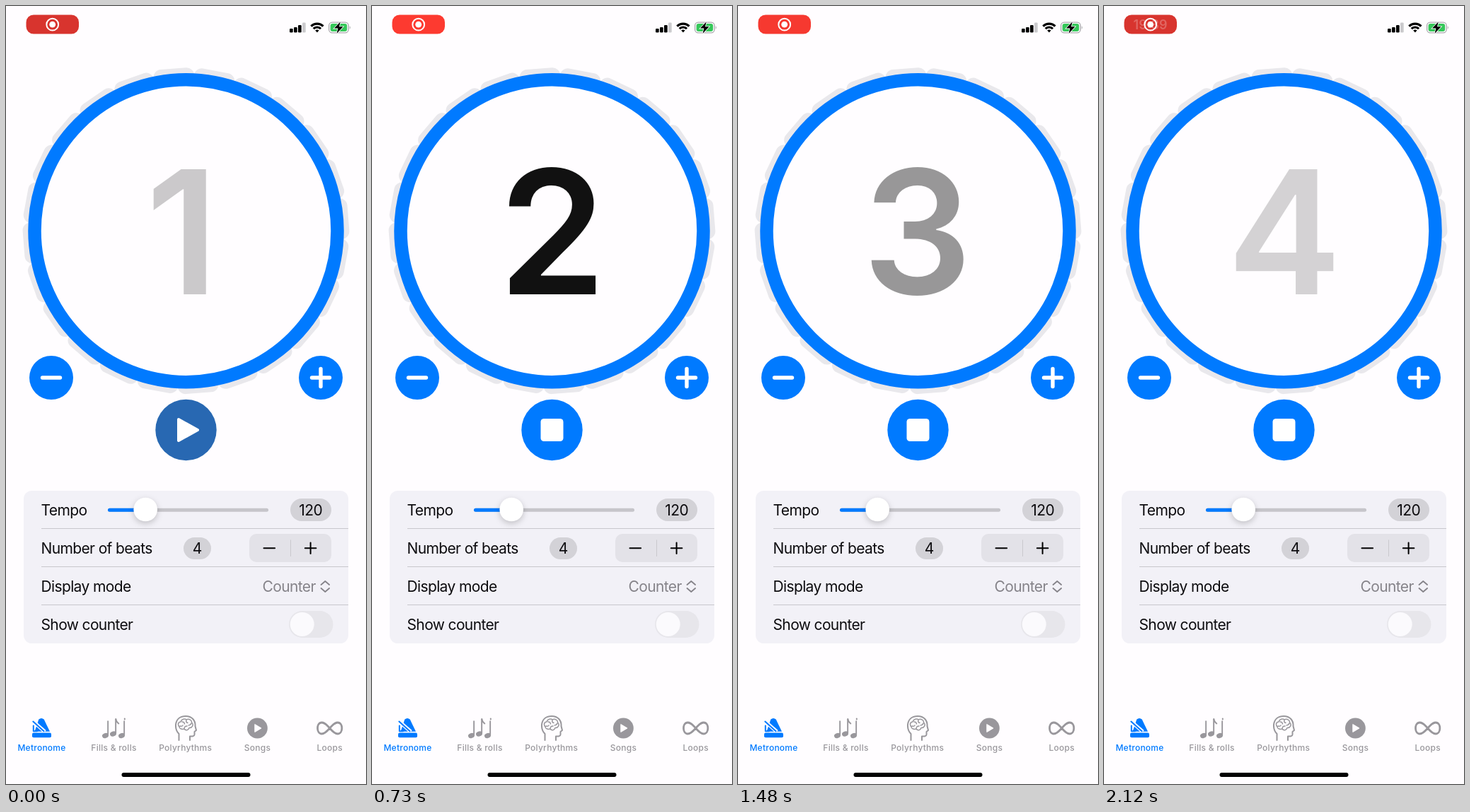
Recreate the animation shown at these times as an HTML page. Size 509 px wide and 1101 px high, loop 2150 ms.

```html
<!DOCTYPE html>
<html lang="en">
<head>
<meta charset="utf-8">
<title>Metronome</title>
<style>
html, body { margin: 0; width: 100%; height: 100%; overflow: hidden; background: #fffdff; }
svg { display: block; width: 100%; height: 100%; font-family: Inter, "Liberation Sans", sans-serif; }
.row { font-size: 21px; letter-spacing: -.03em; fill: #0c0b0e; }
.mid { text-anchor: middle; }
.tab { font-size: 12px; font-weight: 500; letter-spacing: .25px; text-anchor: middle; fill: #99979c; }
.line { fill: none; stroke-linecap: round; stroke-linejoin: round; }
.thumb { filter: drop-shadow(0 3px 4px rgba(0, 0, 0, .2)); }
</style>
</head>
<body>
<svg viewBox="0 0 509 1101">
  <rect width="509" height="1101" fill="#fffdff"/>

  <!-- status bar -->
  <rect id="pill" x="28.5" y="12.5" width="74.5" height="27" rx="10.5"/>
  <text id="clock" x="65.5" y="32.5" class="mid" font-size="18" font-weight="600" fill="#fff">19:39</text>
  <circle cx="65.7" cy="26.2" r="8.4" fill="none" stroke="#fff" stroke-width="2"/>
  <circle cx="65.7" cy="26.2" r="4.4" fill="#fff"/>
  <g id="signal"></g>
  <g class="line" stroke="#000" stroke-width="3.1" style="stroke-linecap:butt">
    <path d="M431.3 28.6a12.3 12.3 0 0 1 17.2 0M434.7 32.2a7.4 7.4 0 0 1 10.4 0"/>
    <path d="M437.2 34.4L439.9 37.4L442.6 34.4Q439.9 32.4 437.2 34.4Z" fill="#000" stroke="none"/>
  </g>
  <rect x="456.6" y="23.1" width="27.6" height="14.8" rx="4.6" fill="none" stroke="#a9a8ac" stroke-width="1.3"/>
  <rect x="458.6" y="25" width="23.6" height="11" rx="3" fill="#35c759"/>
  <path d="M485.8 28.2q2.2 2.2 0 4.8z" fill="#a9a8ac"/>
  <path d="M472.8 22.2L464 31.6H469.4L467.6 39L476.6 29.2H471Z" fill="#000" stroke="#fffdff" stroke-width="1.6" paint-order="stroke"/>

  <!-- dial -->
  <g id="lobes" fill="#e9e8ec"></g>
  <circle cx="254.5" cy="318.2" r="214" fill="#fffdff" stroke="#007aff" stroke-width="18.5"/>
  <text id="digit" y="407.5" font-size="243.5" font-weight="600"></text>

  <!-- buttons -->
  <g fill="#007aff">
    <circle cx="64" cy="526" r="31"/>
    <circle cx="445" cy="526" r="31"/>
    <circle id="button" cx="254.5" cy="600" r="43.2"/>
  </g>
  <path class="line" stroke="#fff" stroke-width="5.4" d="M51.5 526h25M432.5 526h25M445 513.5v25"/>
  <path id="play" d="M244 585L271 600L244 615Z" fill="#fff" stroke="#fff" stroke-width="4" stroke-linejoin="round"/>
  <rect id="stop" x="238.5" y="584" width="32" height="32" rx="4.5" fill="#fff"/>

  <!-- settings -->
  <rect x="25" y="686" width="459" height="216" rx="11.5" fill="#f2f1f7"/>
  <path d="M50 739.5H484M50 793.5H484M50 847.5H484" stroke="#c8c7cc"/>
  <text class="row" x="49.5" y="720.5">Tempo</text>
  <text class="row" x="49.5" y="774.5">Number of beats</text>
  <text class="row" x="49.5" y="828.5">Display mode</text>
  <text class="row" x="49.5" y="882.5">Show counter</text>
  <rect x="144" y="710.7" width="227" height="5" rx="2.5" fill="#c6c5ca"/>
  <rect x="144" y="710.7" width="53" height="5" rx="2.5" fill="#007aff"/>
  <circle class="thumb" cx="197.2" cy="712.5" r="16.8" fill="#fff"/>
  <rect x="402" y="697" width="58" height="32" rx="16" fill="#d3d2d7"/>
  <text class="row mid" x="430.7" y="720.5">120</text>
  <rect x="251" y="752" width="39" height="31" rx="15.5" fill="#d3d2d7"/>
  <text class="row mid" x="270.2" y="774.5">4</text>
  <rect x="344" y="747" width="116" height="40" rx="10" fill="#e3e2e8"/>
  <path d="M402.5 755.5V779" stroke="#c9c8cd"/>
  <path class="line" d="M364.5 767.3h15.6M422.8 767.3h15.6M430.6 759.5v15.6" stroke="#000" stroke-width="2"/>
  <text class="row" x="362.5" y="828.5" style="fill:#858389">Counter</text>
  <path class="line" d="M445.5 819L451.3 814L457.1 819M445.5 824L451.3 829L457.1 824" stroke="#858389" stroke-width="1.8"/>
  <rect x="400" y="856" width="62.5" height="38" rx="19" fill="#e7e6eb"/>
  <circle cx="418.7" cy="875" r="17" fill="#fbfafd"/>

  <!-- tab bar -->
  <g fill="#007aff">
    <path d="M46.3 1009.6Q50 1006.4 53.7 1009.6L62 1026.8H40.5Z"/>
    <path d="M38.5 1012.5L55 1027" stroke="#fffdff" stroke-width="5"/>
    <path class="line" d="M38.3 1012.6L53.5 1026.3M38.8 1018.5V1026.3H44" stroke="#007aff" stroke-width="2"/>
    <rect x="37" y="1028.6" width="27" height="6.6" rx="2"/>
  </g>
  <g fill="#99979c">
    <g id="notes"></g>
    <path class="line" d="M155.3 1009q.5 4 4 6.5M167.8 1009.500v-1" stroke="#99979c" stroke-width="2"/>
    <circle cx="355.4" cy="1022" r="14.4"/>
    <path d="M351.8 1016.5L361 1022L351.800 1027.500Z" fill="#fffdff" stroke="#fffdff" stroke-linejoin="round"/>
  </g>
  <g class="line" stroke="#99979c">
    <path stroke-width="2" d="M244.500 1039V1030Q239.500 1025 240 1017C241 1008.500 247 1005 254 1005C263 1005 268 1011 267.500 1019L269 1025L266.500 1027V1031Q266.500 1034 260 1033.500V1039"/>
    <path stroke-width="1.500" d="M245 1020C242 1017 244 1013 247 1013C248 1009 253 1008 255 1010C259 1008 263 1011 262.500 1014C266 1017 263 1022 259 1021.500C258 1025 254 1026 252 1023C249 1024 245 1023 245 1020ZM249 1013q3 0 3.500 3M255 1010q-1 4 2 4.500M252 1023q0-4 4-4M258 1018q3 0 4-3M246 1019q3 1 4-1"/>
    <path stroke-width="2.800" d="M457.700 1022C453 1016.500 450 1014 446.500 1014C438.500 1014 438.500 1030 446.500 1030C450 1030 453 1027.500 457.700 1022C462.400 1016.500 465.400 1014 468.900 1014C476.900 1014 476.900 1030 468.900 1030C465.400 1030 462.400 1027.500 457.700 1022Z"/>
  </g>
  <text class="tab" x="50.500" y="1054" style="fill:#007aff">Metronome</text>
  <text class="tab" x="152.500" y="1054">Fills &amp; rolls</text>
  <text class="tab" x="253.700" y="1054">Polyrhythms</text>
  <text class="tab" x="355.500" y="1054">Songs</text>
  <text class="tab" x="457.700" y="1054">Loops</text>
  <rect x="163.500" y="1085" width="182" height="6" rx="3" fill="#000"/>
</svg>
<script>
const LOOP = 2150, FADE = 667, LEAD = 15;
const BEATS = [120, 622, 1103, 1626];
const CENTRES = [246, 255, 253.5, 255.5];
const $ = id => document.getElementById(id);
const clamp = x => Math.min(1, Math.max(0, x));
const smooth = (a, b, t) => { const x = clamp((t - a) / (b - a)); return x * x * (3 - 2 * x); };
const mix = (a, b, k) => `rgb(${a.map((v, i) => Math.round(v + (b[i] - v) * k))})`;
const show = (el, on) => el.setAttribute('visibility', on ? 'visible' : 'hidden');

$('signal').innerHTML = [5.5, 7.5, 10.5, 14].map((h, i) =>
  `<rect x="${401 + i * 6}" y="${37.5 - h}" width="4.7" height="${h}" rx="1.2" fill="${i < 3 ? '#000' : '#cbcacd'}"/>`).join('');

$('lobes').innerHTML = Array.from({ length: 24 }, (_, i) =>
  `<rect x="225.5" y="88" width="58" height="26" rx="11" transform="rotate(${i * 15 - 4.5} 254.5 318.2)"/>`).join('');

$('notes').innerHTML = [[140.5, 1032.5], [151.5, 1030], [163.5, 1032.5]].map(([x, y]) =>
  `<ellipse cx="${x}" cy="${y}" rx="4.6" ry="3.5" transform="rotate(-20 ${x} ${y})"/>
   <rect x="${x + 2.7}" y="${y - 21}" width="1.9" height="20"/>`).join('');

// Left edge that puts the middle of each digit's ink on its centre.
const pen = document.createElement('canvas').getContext('2d');
pen.font = '600 243.5px Inter, "Liberation Sans", sans-serif';
const lefts = CENTRES.map((c, i) => {
  const m = pen.measureText(i + 1);
  return c - (m.actualBoundingBoxRight - m.actualBoundingBoxLeft) / 2;
});

function draw(t) {
  const passed = BEATS.filter(b => t >= b - LEAD).length;
  const beat = Math.max(0, passed - 1);
  const digit = $('digit');
  digit.textContent = beat + 1;
  digit.setAttribute('x', lefts[beat]);
  digit.setAttribute('opacity', passed ? 1 - smooth(BEATS[beat], BEATS[beat] + FADE, t) : .2);

  const playing = t >= 60;
  show($('play'), !playing);
  show($('stop'), playing);
  $('button').setAttribute('fill', mix([40, 104, 178], [0, 122, 255], smooth(40, 200, t)));

  const glow = smooth(150, 800, t) * (1 - smooth(1300, 1900, t));
  $('pill').setAttribute('fill', mix([216, 52, 46], [254, 58, 48], glow));
  $('clock').setAttribute('opacity', .25 * smooth(2040, 2130, t));
}

const start = performance.now();
function tick() {
  draw((performance.now() - start) % LOOP);
  requestAnimationFrame(tick);
}
tick();
</script>
</body>
</html>
```
